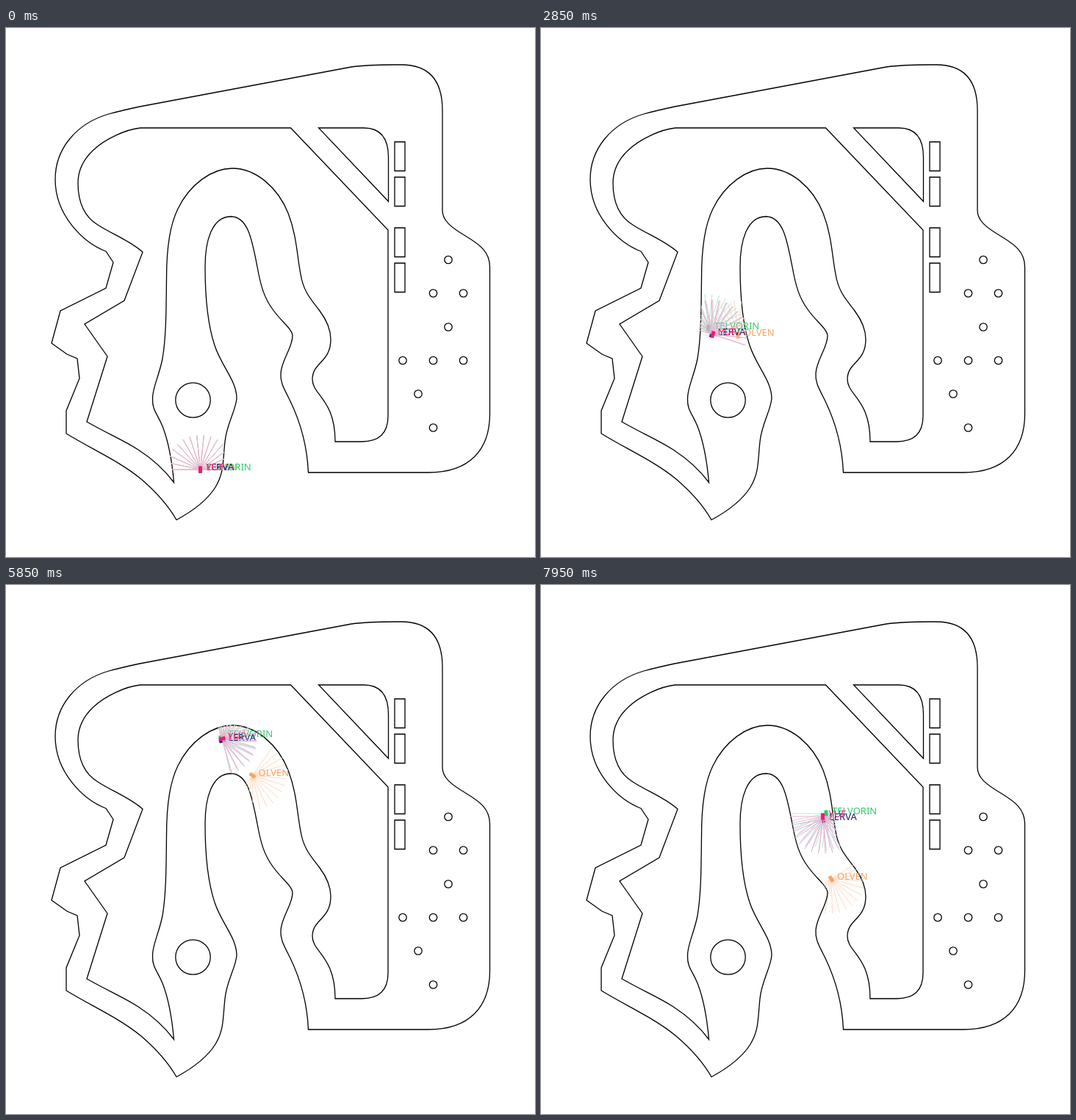
Write an HTML page with a canvas that moves like this. It is 720x720 px and loops after 8000 ms.

```html
<!DOCTYPE html>
<html lang="en">
<head>
<meta charset="utf-8">
<title>Track drivers</title>
<style>
html, body { margin: 0; width: 100%; height: 100%; overflow: hidden; background: #fff; }
canvas { display: block; width: 720px; height: 720px; }
</style>
</head>
<body>
<canvas id="stage" width="720" height="720"></canvas>
<script>
const ctx = document.getElementById('stage').getContext('2d');
const LOOP = 8000, TICK = 150, SPEED = 11.4;
const RAYS = 16, REACH = 47;

const outer = new Path2D(`M62 429 L74 385 L136 354 L146 319 L136 304
  C105 292 67 255 67 206 C67 165 95 130 140 117 C155 113 168 110 182 107
  L470 53 C495 49.5 520 50 538 50 C575 50 594 70 594 112 L594 248
  C594 262 605 271 627 284 C645 295 658.5 305 658.5 325 L658.5 525
  C658.5 575 630 605 575 605 L411.5 605
  C410 570 400 535 387 508 C378 490 373 482 374 470
  C375 452 390 435 390 419 C390 410 375 400 363 383
  C352 368 347 353 342 325 C335 290 330 257 306 256.5
  C280 257 271 290 271 325 C271 370 275 405 284 432
  C293 460 314 480 314 504 C313 520 300 540 298 563
  C295 590 297 605 285 625 C275 641 255 657 232 669.5
  C222 652 205 632 184 614 C155 590 120 575 82 552
  L82 521 L100 477 L97 450 L83 444 Z`);

const inner = new Path2D(`M228.5 618.5 C226 590 220 560 213 542
  C206 525 199 520 199.5 505 C199 490 208 475 213 450
  C218 420 218 385 218.5 340 C218.5 305 222 270 234 246
  C250 213 280 191 308 191 C340 191 370 217 384 252
  C396 283 396 310 401 335 C405 360 416 370 427 385
  C436 397 442 410 442 424 C442 455 417 455 417 478
  C417 500 448 505 448 563 L484 563 C508 563 520 552 520 528
  L520 275 L387.5 136 L183 136 C163 138 135 151 119 166
  C104 180 98 195 98 211 C98 237 107 257 125 268
  C145 281 168 289 186 305 L161 371 L107 403 L138 447 L110 536
  C140 553 160 561 180 574 C200 587 217 603 228.5 618.5 Z`);

const details = new Path2D('M425.5 136 L487 136 C510 136 520.5 150 520.5 176 L520.5 236 Z');
for (const y of [155, 203, 272, 320]) details.rect(529, y, 14, 39.5);
function addCircle(x, y, r) {
  details.moveTo(x + r, y);
  details.arc(x, y, r, 0, 7);
}
addCircle(254.5, 506.5, 23.7);
for (const [x, y] of [[602, 315.5], [581.5, 361], [622.5, 361], [602, 407], [540, 452.5],
  [581.5, 452.5], [622.5, 452.5], [561, 498], [581.5, 544]]) addCircle(x, y, 5.2);

const road = new Path2D(outer);
road.addPath(inner);

// Waypoints: x, y, compass heading in degrees, reached at these ticks.
const marks = [0, 10, 18, 26, 34, 42, 52];
const start = [264.5, 601, 0];
const cars = [
  { name: 'OLVEN', color: '#ffa05f', tint: '#ffd8be', way: [start, [309, 498, 0],
    [268, 418, 0], [261, 327, 0], [292, 250, 75], [357, 297, 180], [395, 400, 148]] },
  { name: 'TELVORIN', color: '#2fc964', tint: '#b8e6c8', way: [start, [212.5, 500, 0],
    [228, 409, 0], [228, 318, 0], [256, 231, 36], [338, 213, 122], [388, 311, 180]] },
  { name: 'LERVA', color: '#191a75', tint: '#bcbcda', way: [start, [207, 505, -14],
    [232.5, 417, 18], [228.5, 325, 0], [257, 238, 36], [337, 217, 125], [384, 319, 170]] },
  { name: 'YUF', color: '#ee1a73', tint: '#f8b2cf', way: [start, [213, 508, -12],
    [234, 417, 18], [250, 327, 0], [256, 235, 36], [337.5, 215, 125], [383.5, 315, 180]] }
];

// Cubic Hermite through the waypoints; the heading follows the velocity.
function pose(way, tick) {
  let i = 0;
  while (i < marks.length - 2 && tick >= marks[i + 1]) i++;
  const span = marks[i + 1] - marks[i], u = (tick - marks[i]) / span;
  const a = way[i], b = way[i + 1], pull = span * SPEED;
  const tangent = p => {
    const h = p[2] * Math.PI / 180;
    return [Math.sin(h) * pull, -Math.cos(h) * pull];
  };
  const ta = tangent(a), tb = tangent(b);
  const at = k => a[k] + (b[k] - a[k]) * u * u * (3 - 2 * u)
    + ta[k] * u * (1 - u) ** 2 - tb[k] * u * u * (1 - u);
  const rate = k => 6 * u * (1 - u) * (b[k] - a[k])
    + ta[k] * (1 - u) * (1 - 3 * u) + tb[k] * u * (3 * u - 2);
  return { x: at(0), y: at(1), dir: Math.atan2(rate(1), rate(0)) };
}

function drawRays({ x, y, dir }, tint) {
  ctx.beginPath();
  for (let i = 0; i < RAYS; i++) {
    const a = dir + (i / (RAYS - 1) - 0.5) * Math.PI;
    const dx = Math.cos(a), dy = Math.sin(a);
    let d = 0;
    while (d < REACH && ctx.isPointInPath(road, x + dx * d, y + dy * d, 'evenodd')) d++;
    ctx.moveTo(x, y);
    ctx.lineTo(x + dx * d, y + dy * d);
  }
  ctx.strokeStyle = tint;
  ctx.lineWidth = 1;
  ctx.stroke();
}

function drawCar({ name, color, tint, way }, tick) {
  const p = pose(way, tick);
  drawRays(p, tint);
  ctx.fillStyle = color;
  ctx.save();
  ctx.translate(p.x, p.y);
  ctx.rotate(p.dir);
  ctx.beginPath();
  ctx.roundRect(-4.5, -2.5, 9, 5, 1);
  ctx.fill();
  ctx.restore();
  ctx.fillText(name, p.x + 8, p.y + 0.5);
}

function draw(tick) {
  ctx.fillStyle = '#fff';
  ctx.fillRect(0, 0, 720, 720);
  ctx.strokeStyle = '#000';
  ctx.lineWidth = 1.3;
  for (const path of [outer, inner, details]) ctx.stroke(path);
  ctx.font = '13px "Noto Sans", "Open Sans", sans-serif';
  for (const car of cars) drawCar(car, tick);
}

let shown = -1;
function frame() {
  const t = performance.now() % LOOP;
  const tick = Math.max(0, Math.floor(t / TICK) - 1);
  if (tick !== shown) draw(shown = tick);
  requestAnimationFrame(frame);
}
frame();
</script>
</body>
</html>
```
